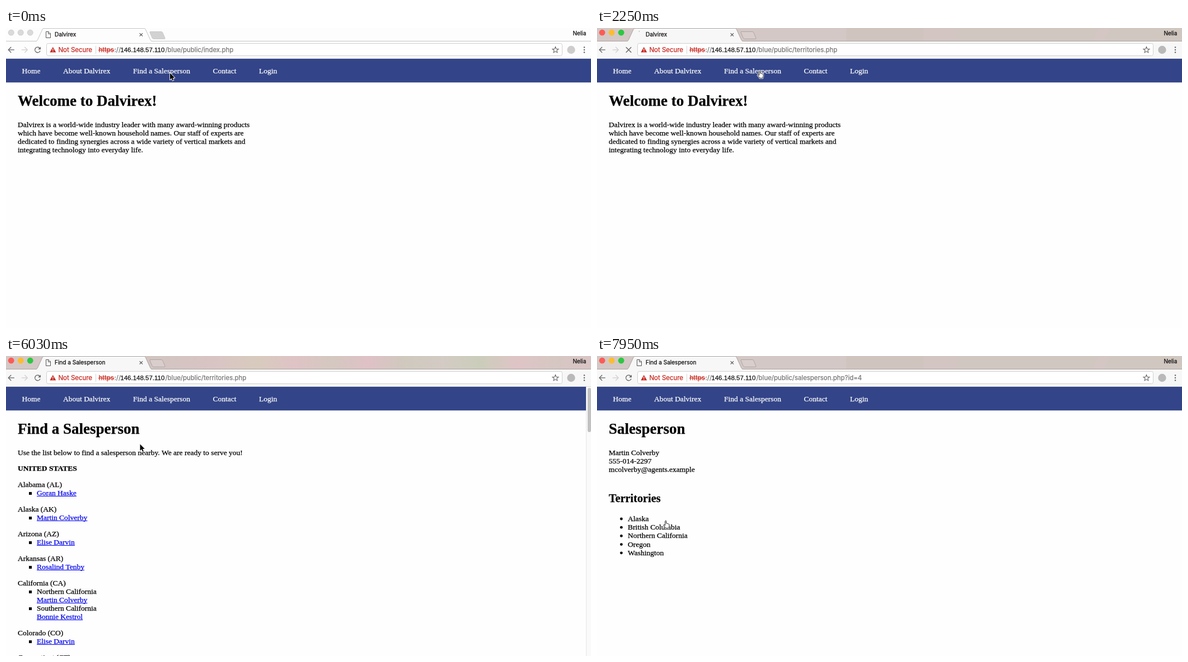
An HTML page with a canvas that plays this animation: 1045 px wide and 536 px high, repeating every 8 s.

```html
<!DOCTYPE html>
<html lang="en">
<head>
<meta charset="utf-8">
<title>Find a Salesperson</title>
<style>
html, body { margin: 0; width: 100%; height: 100%; overflow: hidden; background: #fff; }
canvas { display: block; width: 1045px; height: 536px; }
</style>
</head>
<body>
<canvas id="stage"></canvas>
<script>
const W = 1045, H = 536, LOOP = 8000;
const SERIF = '"Liberation Serif", serif';
const UI = 'Inter, sans-serif';
const ICON = '#666';
const canvas = document.getElementById('stage');
const ctx = canvas.getContext('2d');
const dpr = window.devicePixelRatio || 1;
canvas.width = W * dpr;
canvas.height = H * dpr;

const COMPANY = 'Dalvirex';
const ARROW = new Path2D('M0 0V11.8L2.7 9.3L4.5 13.4L6.3 12.6L4.6 8.600H8.300Z');
const HAND = new Path2D('M4.2 9V2Q4.2.8 5.2.8Q6.3.8 6.3 2V5.5Q7.5 4.8 8.2 6Q9.5 5.5 10 6.7Q11.6 6.3 11.6 8L11.4 11L10.4 14.2H5L4.4 12.5L1.6 9.3Q1.2 8 2.4 7.9Z');
const TAB = new Path2D('M54 23.5Q55.500 23 56.300 21.500L65 2.500Q66 .5 68 .5H246.500Q248.500 .5 249.300 2.500L258 21.500Q258.700 23 260.500 23.5');
const NEW_TAB = new Path2D('M258 6.500H277Q279 6.500 280 8.500L284 18Q284.500 19.500 283 19.500H264Q262 19.500 261 17.500L257 8Q256.500 6.500 258 6.500Z');

// time, shape, x, y
const POINTER = [
  [0, 'arrow', 293, 80.5], [150, 'arrow', 291.5, 80.5], [330, 'arrow', 283.5, 75.5],
  [470, 'arrow', 279.5, 80], [620, 'arrow', 269.5, 103], [770, 'arrow', 280, 110],
  [920, 'arrow', 289.5, 80.5], [1060, 'arrow', 289.5, 75.5], [1800, 'hand', 285.5, 75.5],
  [6030, 'arrow', 239.5, 157.5], [6170, 'arrow', 209.5, 229.5], [6620, 'arrow', 186.5, 243],
  [6760, 'arrow', 163.5, 259], [6910, 'arrow', 141.5, 276], [7060, 'hand', 127.5, 285],
  [7200, 'hand', 117.5, 293.5]
];

const STATES = [
  ['Alabama (AL)', 'Goran Haske'],
  ['Alaska (AK)', 'Martin Colverby'],
  ['Arizona (AZ)', 'Elise Darvin'],
  ['Arkansas (AR)', 'Rosalind Tenby'],
  ['California (CA)', ['Northern California', 'Martin Colverby'], ['Southern California', 'Bonnie Kestrol']],
  ['Colorado (CO)', 'Elise Darvin'],
  ['Connecticut (CT)']
];

// A hairline stroke gives the slightly heavier look of smoothed screen type.
function text(str, x, y, font, color = '#000') {
  ctx.font = font;
  ctx.fillStyle = ctx.strokeStyle = color;
  ctx.lineWidth = .25;
  ctx.fillText(str, x, y);
  ctx.strokeText(str, x, y);
  return ctx.measureText(str).width;
}

const body = (str, x, y, color) => text(str, x, y, '13.5px ' + SERIF, color);
const heading = (str, y, size = 27) => text(str, 21, y, `bold ${size}px ${SERIF}`);

function rect(x, y, w, h, color) {
  ctx.fillStyle = color;
  ctx.fillRect(x, y, w, h);
}

function rounded(x, y, w, h, r, fill, stroke) {
  ctx.beginPath();
  ctx.roundRect(x, y, w, h, r);
  ctx.fillStyle = fill;
  ctx.fill();
  if (stroke) {
    ctx.strokeStyle = stroke;
    ctx.lineWidth = 1;
    ctx.stroke();
  }
}

function disc(x, y, r, color) {
  ctx.beginPath();
  ctx.arc(x, y, r, 0, Math.PI * 2);
  ctx.fillStyle = color;
  ctx.fill();
}

function line(points, color, width = 1, close = false) {
  ctx.beginPath();
  points.forEach(([x, y]) => ctx.lineTo(x, y));
  if (close) ctx.closePath();
  ctx.strokeStyle = color;
  ctx.lineWidth = width;
  ctx.stroke();
}

function cross(x, y, r, color, width) {
  line([[x - r, y - r], [x + r, y + r]], color, width);
  line([[x + r, y - r], [x - r, y + r]], color, width);
}

function link(str, x, y) {
  const w = body(str, x, y, '#0000ee');
  rect(x, y + 1, w, 1, '#0000ee');
}

function strip(focused, vivid) {
  rect(0, 0, W, 24, focused ? '#d3c8c5' : '#fdfdfd');
  if (!focused) return;
  if (vivid) {
    const tint = ctx.createLinearGradient(250, 0, W, 0);
    ['#d2c5c1', '#d5c4c2', '#d9c5c3', '#d8cbbe', '#dfc3c5', '#d4c8c0', '#dfc1c6',
      '#cfc9be', '#d3cbc4', '#cbcdbb', '#dfc4c6', '#d6c7c2', '#d9c4c4']
      .forEach((c, i, all) => tint.addColorStop(i / (all.length - 1), c));
    rect(250, 0, W - 250, 24, tint);
  } else {
    rect(445, 0, 138, 24, '#d0c5be');
    rect(583, 0, 62, 24, '#d3c5c2');
    rect(645, 0, 400, 24, '#d1c7c1');
    ctx.beginPath();
    ctx.moveTo(886, 24);
    ctx.quadraticCurveTo(890, 8, 898, 0);
    ctx.lineTo(918, 0);
    ctx.quadraticCurveTo(909, 10, 907, 24);
    ctx.fillStyle = '#d4c6c3';
    ctx.fill();
  }
}

function tabs(s) {
  strip(s.focused, s.vivid);
  const lights = s.focused ? ['#fc5b57', '#fdbc2f', '#2bc840'] : ['#dadada', '#dadada', '#dadada'];
  lights.forEach((c, i) => {
    disc(9.2 + 17 * i, 8.2, 5.4, s.focused ? c : '#cbcbcb');
    disc(9.2 + 17 * i, 8.2, 4.6, c);
  });

  const edge = s.focused ? '#aaa3a1' : '#c4c4c4';
  rect(0, 23, W, 1, edge);
  ctx.fillStyle = s.focused ? '#f8f7f7' : '#fdfdfd';
  ctx.fill(TAB);
  rect(55, 23, 204, 1, ctx.fillStyle);
  ctx.strokeStyle = edge;
  ctx.lineWidth = 1;
  ctx.stroke(TAB);
  ctx.fillStyle = s.focused ? '#d9cecb' : '#d2d2d2';
  ctx.fill(NEW_TAB);
  ctx.strokeStyle = s.focused ? '#afa6a4' : '#cacaca';
  ctx.stroke(NEW_TAB);

  if (s.loading) {
    ctx.beginPath();
    ctx.arc(76, 12, 6, -Math.PI / 2 - s.sweep, -Math.PI / 2);
    ctx.strokeStyle = '#999';
    ctx.lineWidth = 1.5;
    ctx.stroke();
  } else {
    line([[71.5, 6.5], [76, 6.5], [79.5, 10], [79.5, 17.5], [71.5, 17.5]], '#555', 1, true);
    line([[75.5, 6.5], [75.5, 10.5], [79.5, 10.5]], '#555');
  }
  text(s.title, 87, 15.3, '10.05px ' + UI, '#111');
  cross(241.3, 12, 2.7, '#555', 1.2);
  text('Nelia', 1012.5, 12.7, '10.05px ' + UI, '#111');
}

function star(x, y) {
  const points = Array.from({ length: 10 }, (_, i) => {
    const a = -Math.PI / 2 + i * Math.PI / 5, r = i % 2 ? 2.5 : 5.7;
    return [x + r * Math.cos(a), y + r * Math.sin(a)];
  });
  line(points, ICON, 1.1, true);
}

function arrowIcon(x, dir, color) {
  line([[x - 5.3 * dir, 39], [x + 5 * dir, 39]], color, 1.3);
  line([[x + .3 * dir, 34], [x + 5.3 * dir, 39], [x + .3 * dir, 44]], color, 1.3);
}

function toolbar(s) {
  rect(0, 24, W, 31, s.focused ? '#f8f7f7' : '#fdfdfd');
  rect(0, 54, W, 1, '#dcdcdc');
  arrowIcon(9.5, -1, ICON);
  arrowIcon(33, 1, '#d0d0d0');
  if (s.loading) {
    cross(56.5, 39, 4.7, ICON, 1.5);
  } else {
    ctx.beginPath();
    ctx.arc(56.5, 39, 4.8, .35, Math.PI * 1.75);
    ctx.strokeStyle = ICON;
    ctx.lineWidth = 1.4;
    ctx.stroke();
    ctx.fillStyle = ICON;
    ctx.fill(new Path2D('M62 33.500V38.300H57.200Z'));
  }

  rounded(72.5, 27.5, 921, 22, 3, '#fff', '#cfcfcf');
  const red = '#c9271e', font = '11.45px ' + UI;
  ctx.fillStyle = red;
  ctx.fill(new Path2D('M83.800 34L89.300 43.500H78.300Z'));
  rect(83.2, 37, 1.2, 3.3, '#fff');
  rect(83.2, 41.1, 1.2, 1.2, '#fff');
  text('Not Secure', 93.5, 43.2, font, red);
  rect(160, 32, 1, 14, '#d5d5d5');
  const w = text('https', 165.5, 43.2, font, red);
  rect(165, 39, w + 1, 1, red);
  text('://', 193.5, 43.2, font, '#777');
  text('146.148.57.110', 204.3, 43.2, '11.5px "Liberation Sans", sans-serif', '#111');
  text('/blue/public/' + s.path, 284.5, 43.2, font, '#777');

  star(981.5, 39.3);
  disc(1009.5, 39, 7.2, s.focused ? '#b9b9b9' : '#cdcdcd');
  [34.5, 39, 43.5].forEach(y => disc(1033, y, 1.25, ICON));
}

function nav(width) {
  rect(0, 55, width, 42.3, '#334488');
  [['Home', 28.5], ['About ' + COMPANY, 102], ['Find a Salesperson', 227], ['Contact', 369.5], ['Login', 452]]
    .forEach(([label, x]) => body(label, x, 81, '#fff'));
}

function homePage() {
  heading(`Welcome to ${COMPANY}!`, 139);
  [
    COMPANY + ' is a world-wide industry leader with many award-winning products',
    'which have become well-known household names. Our staff of experts are',
    'dedicated to finding synergies across a wide variety of vertical markets and',
    'integrating technology into everyday life.'
  ].forEach((str, i) => body(str, 21, 176.6 + i * 15.2));
}

function listPage() {
  heading('Find a Salesperson', 139);
  body('Use the list below to find a salesperson nearby. We are ready to serve you!', 21, 176.6);
  heading('UNITED STATES', 205, 13.5);
  let y = 234;
  for (const [state, ...items] of STATES) {
    body(state, 21, Math.round(y));
    for (const item of items) {
      y += 15.2;
      rect(41, Math.round(y) - 6, 5, 5, '#000');
      if (Array.isArray(item)) {
        body(item[0], 55, Math.round(y));
        y += 15.2;
        link(item[1], 55, Math.round(y));
      } else {
        link(item, 55, Math.round(y));
      }
    }
    y += 28.7;
  }
  rect(1036, 55, 9, H - 55, '#fafafa');
  rect(1036, 55, 1, H - 55, '#e6e6e6');
  rounded(1039, 57, 6, 79, 3, '#c1c1c1');
}

function personPage() {
  heading('Salesperson', 139);
  ['Martin Colverby', '555-014-2297', 'mcolverby@agents.example']
    .forEach((str, i) => body(str, 21, 176.6 + i * 15.2));
  heading('Territories', 261, 20.25);
  ['Alaska', 'British Columbia', 'Northern California', 'Oregon', 'Washington'].forEach((str, i) => {
    const y = 295 + i * 15.2;
    disc(43.5, y - 4, 2.4, '#000');
    body(str, 55, y);
  });
}

function pointer(t) {
  const [, shape, x, y] = POINTER.filter(p => p[0] <= t).pop();
  const hand = shape === 'hand', path = hand ? HAND : ARROW;
  ctx.save();
  ctx.translate(x, y);
  ctx.lineJoin = 'round';
  ctx.strokeStyle = '#fff';
  ctx.lineWidth = hand ? 2.4 : 1.8;
  ctx.stroke(path);
  ctx.fillStyle = hand ? '#fff' : '#000';
  ctx.fill(path);
  if (hand) {
    ctx.strokeStyle = '#000';
    ctx.lineWidth = .9;
    ctx.stroke(path);
  }
  ctx.restore();
}

function stateAt(t) {
  const first = t >= 2100 && t < 2400, second = t >= 7650 && t < 7950;
  return {
    focused: t >= 1360,
    vivid: t < 2100 || (t >= 2400 && t < 7650),
    loading: first || second,
    sweep: first ? (t < 2250 ? 0 : .2) : (t < 7800 ? .25 : 1.1),
    title: t < 2550 ? COMPANY : 'Find a Salesperson',
    path: t < 2250 ? 'index.php' : t < 7950 ? 'territories.php' : 'salesperson.php?id=4',
    page: t < 2400 ? homePage : t < 7950 ? listPage : personPage
  };
}

function draw(t) {
  const s = stateAt(t);
  ctx.setTransform(dpr, 0, 0, dpr, 0, 0);
  rect(0, 0, W, H, '#fefefe');
  tabs(s);
  toolbar(s);
  nav(s.page === listPage ? 1036 : W);
  s.page();
  pointer(t);
}

const start = performance.now();
function tick() {
  draw((performance.now() - start) % LOOP);
  requestAnimationFrame(tick);
}
tick();
</script>
</body>
</html>
```
